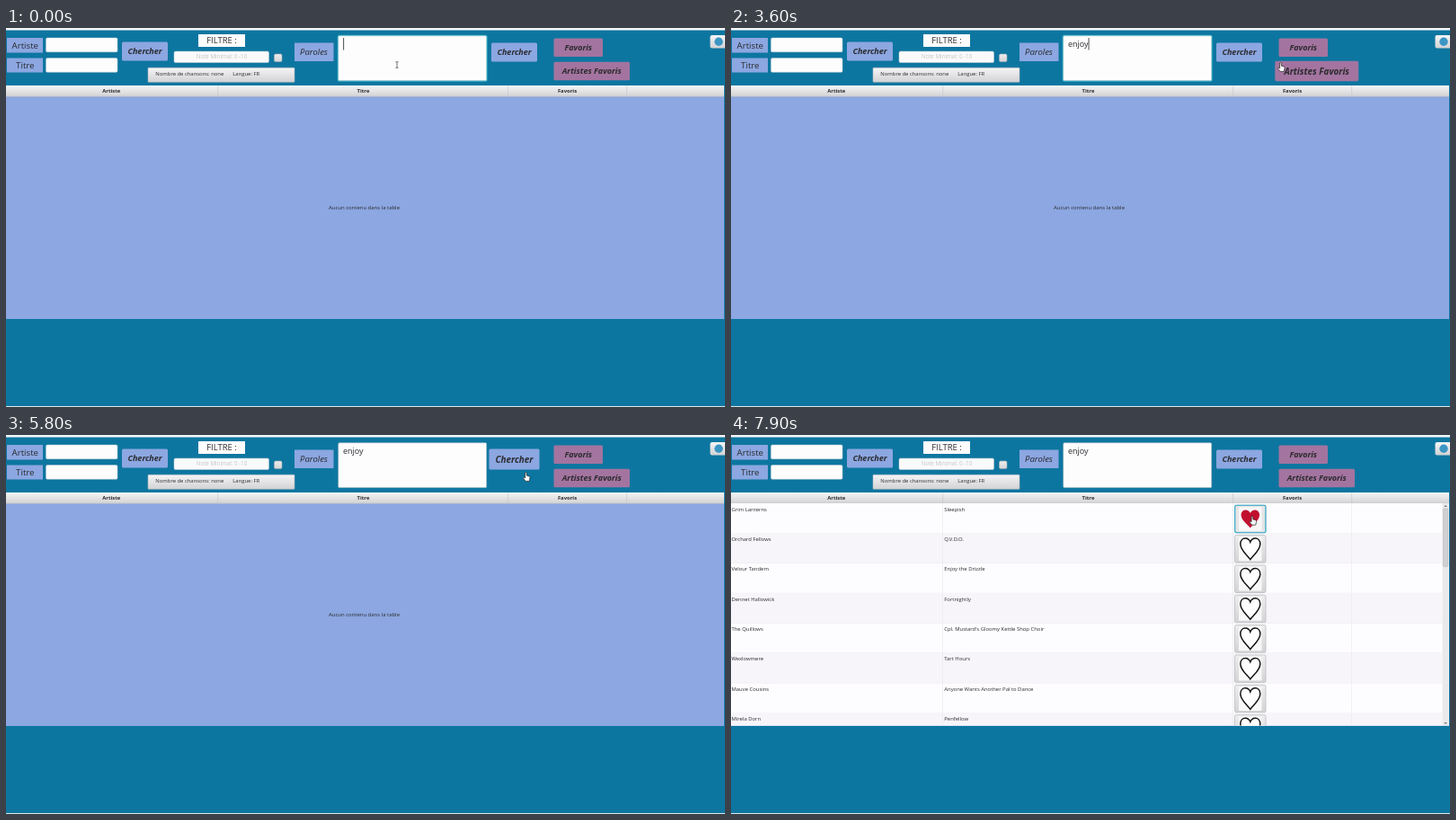
An HTML page that plays this animation: 800 px wide and 422 px high, repeating every 8000 ms.

```html
<!DOCTYPE html>
<html lang="fr">
<head>
<meta charset="utf-8">
<title>Recherche de paroles</title>
<style>
  html, body { margin: 0; width: 100%; height: 100%; overflow: hidden; background: #0d76a0; }
  svg { display: block; width: 100vw; height: 100vh; }
  text { font-family: "Open Sans", "Noto Sans", sans-serif; fill: #2b2b2f; white-space: pre; }
  .b { font-weight: 700; }
  .i { font-style: italic; }
  .m { text-anchor: middle; }
</style>
</head>
<body>
<svg id="stage" viewBox="0 0 800 422">
  <defs>
    <linearGradient id="bar" x2="0" y2="1">
      <stop offset="0" stop-color="#f5f5f6"/><stop offset="1" stop-color="#d2d2d4"/>
    </linearGradient>
    <linearGradient id="btn" x2="0" y2="1">
      <stop offset="0" stop-color="#ededee"/><stop offset="1" stop-color="#d4d4d6"/>
    </linearGradient>
    <clipPath id="body"><rect y="76" width="799" height="247.5"/></clipPath>
  </defs>
</svg>
<script>
const LOOP = 8000, STEP = 100;
const SENT = 4500, FROZEN = 4600, LOADED = 5900, THAWED = 6000, LIKED = 7200;
const BLUE = '#8ca7e1', PLUM = '#a3749f';
const stage = document.getElementById('stage');

function add(parent, tag, attrs, content) {
  const el = document.createElementNS('http://www.w3.org/2000/svg', tag);
  for (const k in attrs) el.setAttribute(k, attrs[k]);
  if (content) el.textContent = content;
  parent.appendChild(el);
  return el;
}
const group = (parent = stage, attrs) => add(parent, 'g', attrs);
const box = (p, x, y, width, height, fill, more) =>
  add(p, 'rect', { x, y, width, height, fill, ...more });
const label = (p, s, x, y, size, cls = '', more) =>
  add(p, 'text', { x, y, 'font-size': size, class: cls, ...more }, s);
const show = (el, on) => el.setAttribute('visibility', on ? 'visible' : 'hidden');

function button(s, x, y, w, h, fill, cls = 'b i m', size = 9) {
  const g = group();
  const cx = x + w / 2, cy = y + h / 2;
  box(g, x, y, w, h, fill, { rx: 1.5 });
  label(g, s, cx, cy + size * 0.36, size, cls);
  return {
    grow(on) {
      const k = on ? 1.1 : 1;
      g.setAttribute('transform', `translate(${cx} ${cy}) scale(${k}) translate(${-cx} ${-cy})`);
    },
    has: (px, py) => px >= x && px <= x + w && py >= y && py <= y + h
  };
}

// Window and toolbar
box(stage, 0, 0, 800, 422, '#0d76a0');
box(stage, 0, 0, 800, 2.5, '#f4f7f9');
box(stage, 0, 421, 800, 1, '#dfe9ee');

box(stage, 1, 11, 40, 16.5, BLUE);
box(stage, 1, 33.5, 40, 16, BLUE);
label(stage, 'Artiste', 21.3, 22.8, 9.7, 'm');
label(stage, 'Titre', 21.3, 44.8, 9.7, 'm');
for (const y of [11, 33.5])
  box(stage, 44.5, y, 79.5, 15.7, '#fdfdfe', { rx: 1.5, stroke: '#c3ccd2', 'stroke-width': 0.5 });
button('Chercher', 129, 15.5, 51, 21, BLUE);

box(stage, 214, 7, 52, 14, '#fdfdfe');
label(stage, 'FILTRE :', 240, 17.4, 9.5, 'm');
box(stage, 187, 26, 105.5, 12.5, '#fafafb', { rx: 1.5, stroke: '#c3ccd2', 'stroke-width': 0.5 });
label(stage, 'Note Minimal: 0 -10', 240, 34.4, 6.2, 'm', { style: 'fill:#c4c4c8' });
box(stage, 298.5, 29, 8.5, 8.5, 'url(#btn)', { rx: 1.5, stroke: '#aeb0b4', 'stroke-width': 0.6 });
box(stage, 158, 44.3, 163, 16, 'url(#bar)', { rx: 0.8, stroke: '#b4b8bc', 'stroke-width': 0.6 });
label(stage, 'Nombre de chansons: none', 166.3, 53.2, 5.9);
label(stage, 'Langue: FR', 252.3, 53.2, 5.9);

box(stage, 321, 16.5, 43.5, 20.5, BLUE);
label(stage, 'Paroles', 342.5, 30.3, 9.5, 'i m');

const ring = box(stage, 368.7, 7.7, 167, 52, '#27b0c8', { rx: 2 });
box(stage, 369.8, 8.8, 164.8, 49.8, '#fdfdfe', { rx: 1.2, stroke: '#b5bfc6', 'stroke-width': 0.6 });
const typed = label(stage, '', 375, 21, 9);
const caret = box(stage, 0, 11, 0.8, 13.5, '#222');

const search = button('Chercher', 540, 16.5, 51, 21, BLUE);
button('Favoris', 609.5, 11.5, 54.5, 20.5, PLUM);
const artists = button('Artistes Favoris', 609.5, 37.8, 84.5, 20.4, PLUM);

box(stage, 783.5, 8, 18, 14.5, 'url(#bar)', { rx: 2 });
add(stage, 'circle', { cx: 793, cy: 15.2, r: 4.7, fill: '#3b96c4' });

// Table
box(stage, 0, 76, 799, 248, BLUE);
label(stage, 'Aucun contenu dans la table', 398.5, 202.2, 5.97, 'm');
box(stage, 0, 64, 799, 12.3, 'url(#bar)');
box(stage, 0, 75.8, 799, 0.6, '#b9bcc0');
for (const x of [235.5, 558.5, 690.5]) box(stage, x, 64.5, 0.6, 11.5, '#c4c4c8');
for (const [s, x] of [['Artiste', 117.3], ['Titre', 397.5], ['Favoris', 624.5]])
  label(stage, s, x, 72.2, 5.9, 'b m');

const songs = [
  ['Grim Lanterns', 'Sleepish'],
  ['Orchard Fellows', 'Q.V.D.O.'],
  ['Velour Tandem', 'Enjoy the Drizzle'],
  ['Dennet Hallowick', 'Fortnightly'],
  ['The Quillows', "Cpl. Mustard's Gloomy Kettle Shop Choir"],
  ['Wexlowmere', 'Tart Hours'],
  ['Mauve Cousins', 'Anyone Wants Another Pal to Dance'],
  ['Mirela Dorn', 'Penfellow']
];
const HEART = 'M0 12C-3 7.5-11 2-11-5C-11-9-8.5-11.5-5.6-11.5C-3-11.5-1-10 0-7.3' +
  'C1-10 3-11.5 5.6-11.5C8.5-11.5 11-9 11-5C11 2 3 7.5 0 12Z';
const ROW = 33.35;

const table = group(stage, { 'clip-path': 'url(#body)' });
box(table, 0, 76, 799, 248, '#fdfcfe');
songs.forEach(([artist, title], n) => {
  const y = 76.2 + n * ROW;
  if (n % 2) box(table, 0, y, 791, ROW, '#f7f5f9');
  box(table, 0, y + ROW - 0.5, 791, 0.5, '#ebe9ed');
  label(table, artist, 0.5, y + 8.5, 5.9);
  label(table, title, 237.3, y + 8.5, 5.9);
  box(table, 560.5, y + 2, 34.5, 30.6, 'url(#btn)', { rx: 1.8, stroke: '#b6b6ba', 'stroke-width': 0.7 });
  box(table, 565, y + 4, 25.5, 26.6, '#f8f8f9', { rx: 1 });
  add(table, 'path', {
    d: HEART, transform: `translate(577.8 ${y + 17})`,
    fill: '#fff', stroke: '#111', 'stroke-width': 1.5
  });
});
for (const x of [235.5, 558.5, 690.5]) box(table, x, 76, 0.5, 248, '#e6e4e8');
box(table, 791.5, 76, 7.2, 248, '#e9e9eb');
box(table, 792.4, 82, 5.4, 64.5, '#d0d0d3', { rx: 1, stroke: '#b4b4b8', 'stroke-width': 0.5 });
add(table, 'path', { d: 'M793.4 80l1.7-2 1.7 2zM793.4 320l1.7 2 1.7-2z', fill: '#77777b' });

const liked = group();
box(liked, 560.7, 78.3, 34.2, 30.4, '#e4e4e6', { rx: 1.8, stroke: '#25a5c6', 'stroke-width': 1.1 });
box(liked, 565, 80.2, 25.5, 26.6, '#f8f8f9', { rx: 1 });
add(liked, 'path', { d: HEART, transform: 'translate(577.8 93.2) scale(.93 .85)', fill: '#c20f2f' });

// Pointers, each with its hot spot at the origin
const pointers = { beam: group(), arrow: group(), hand: group() };
add(pointers.beam, 'path', {
  d: 'M-1.6-3.3H-.4L0-3L.4-3.3H1.6M0-3V3M-1.6 3.3H-.4L0 3L.4 3.3H1.6',
  fill: 'none', stroke: '#333', 'stroke-width': 0.7
});
add(pointers.arrow, 'path', {
  d: 'M0 0V7L1.6 5.6L2.8 8.1L3.8 7.6L2.7 5.2H4.8Z', fill: '#222', stroke: '#fff', 'stroke-width': 0.5
});
add(pointers.hand, 'path', {
  d: 'M-.9.3Q0-.5.8.3V3.4L3.7 4.2Q4.6 4.6 4.5 5.8L3.8 9.7H-.4L-3 6.4Q-2.9 5-1.8 5.6L-.9 6.3Z',
  fill: '#fff', stroke: '#222', 'stroke-width': 0.7
});

const path = [
  [0, 435, 41], [2800, 435, 41], [3500, 611.5, 38.7], [3700, 611.5, 38.7],
  [4200, 586, 29.7], [5500, 586, 29.7], [5800, 578.5, 41.7], [5900, 565, 54],
  [6400, 565, 56], [6900, 580, 90.5], [LOOP, 580, 90.5]
];
function pointerAt(t) {
  const n = path.findIndex(p => p[0] > t);
  const [t0, x0, y0] = path[n - 1], [t1, x1, y1] = path[n];
  const k = (t - t0) / (t1 - t0);
  return [x0 + (x1 - x0) * k, y0 + (y1 - y0) * k];
}

const WORD = 'enjoy', keys = [1700, 2000, 2200, 2400, 2500];
function caretOn(t) {
  if (t >= SENT) return false;
  if (t >= 2500) return (t - 2500) % 1000 < 500;
  return t < 500 || (t >= 1000 && t < 1600) || t >= 1700;
}

function draw(time) {
  const t = Math.floor((time % LOOP) / STEP) * STEP;
  const [x, y] = pointerAt(t);
  const frozen = t >= FROZEN && t < LOADED;

  typed.textContent = WORD.slice(0, keys.filter(k => k <= t).length);
  caret.setAttribute('x', 375 + (typed.textContent ? typed.getComputedTextLength() : 0.3));
  show(caret, caretOn(t));
  show(ring, t < SENT);

  const onSearch = search.has(x, y) || (t >= FROZEN && t < THAWED);
  const onArtists = artists.has(x, y) && !frozen;
  const onHeart = t >= LOADED && x > 560 && x < 595 && y > 78;
  search.grow(onSearch);
  artists.grow(onArtists);
  show(table, t >= LOADED);
  show(liked, t >= LIKED);

  let kind = 'arrow';
  if (frozen || search.has(x, y) || onArtists || onHeart) kind = 'hand';
  else if (x < 535) kind = 'beam';
  for (const k in pointers) show(pointers[k], k === kind);
  pointers[kind].setAttribute('transform', `translate(${x} ${y})`);
}

const start = performance.now();
function tick() {
  draw(performance.now() - start);
  requestAnimationFrame(tick);
}
tick();
</script>
</body>
</html>
```
